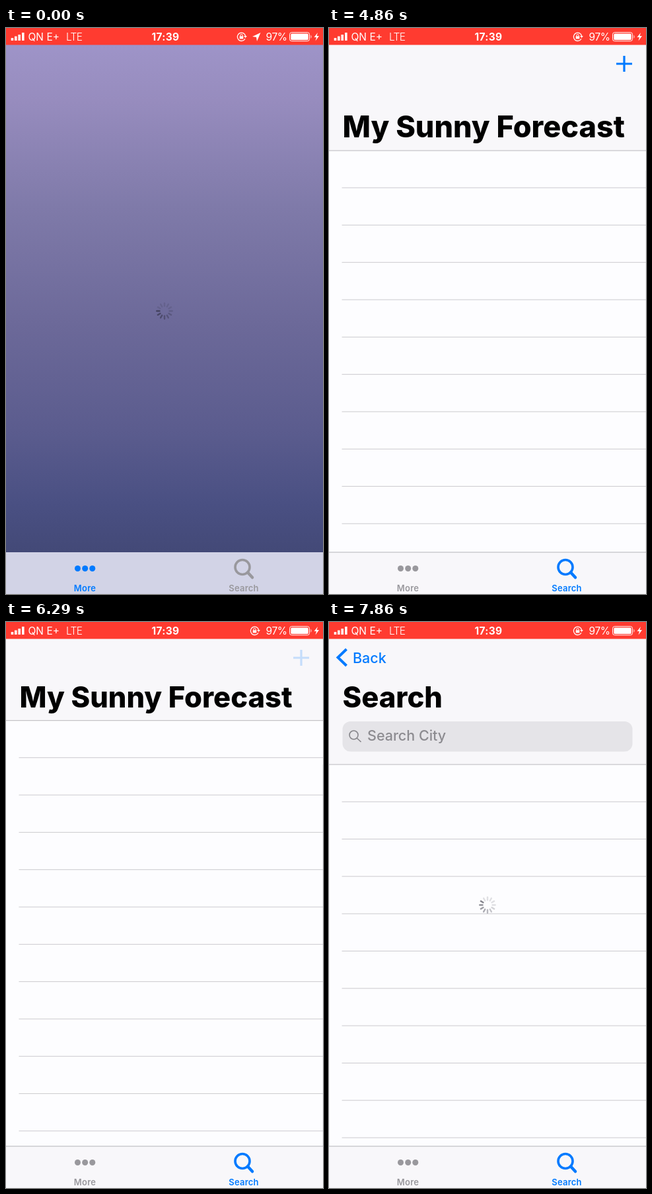
Write an HTML page that moves like this. It is 480 by 854 pixels and loops after 8 s.

```html
<!DOCTYPE html>
<html lang="en">
<head>
<meta charset="utf-8">
<title>Weather app</title>
<style>
  html, body { margin: 0; width: 100%; height: 100%; overflow: hidden; background: #fdfdff; }
  svg { display: block; width: 100%; height: 100%; }
  text { font-family: Inter, sans-serif; }
  .weather text { font-family: "Noto Sans CJK KR", "Noto Sans CJK", "Noto Sans CJK JP", sans-serif; font-weight: 500; fill: #fff; text-anchor: middle; }
  .title { font-size: 43.5px; font-weight: 800; }
  .field { font-size: 21.5px; font-weight: 500; }
  .label { font-size: 13px; font-weight: 600; text-anchor: middle; stroke: none; letter-spacing: .2px; }
  .status { font-size: 15.5px; fill: #fff; }
  .rows { stroke: #cbcace; stroke-width: 1; }
</style>
</head>
<body>
<svg viewBox="0 0 480 854" preserveAspectRatio="none">
  <defs>
    <linearGradient id="sky" x2="0" y2="1">
      <stop offset="0" stop-color="#9e94c8"/>
      <stop offset=".11" stop-color="#978cbe"/>
      <stop offset=".32" stop-color="#7f7aa9"/>
      <stop offset=".55" stop-color="#6c6999"/>
      <stop offset=".76" stop-color="#5b5c8e"/>
      <stop offset=".9" stop-color="#4a5083"/>
      <stop offset="1" stop-color="#434977"/>
    </linearGradient>
    <linearGradient id="puff" x2="0" y2="1">
      <stop offset=".3" stop-color="#fff"/>
      <stop offset=".8" stop-color="#e6e4e6"/>
      <stop offset="1" stop-color="#a9a6ac"/>
    </linearGradient>
  </defs>

  <g id="weather" class="weather">
    <rect y="25" width="480" height="767" fill="url(#sky)"/>
    <g id="report">
      <text x="238.5" y="152" font-size="86">Ansan</text>
      <text x="240" y="227" font-size="48">Current: 2.0°</text>
      <text x="240.5" y="286" font-size="38">Max: 3.0°</text>
      <text x="240.5" y="332" font-size="38">Min: 1.0°</text>
      <path d="M381 222.500Q408 225 437 222.500" fill="none" stroke="#55516e" stroke-width="2" opacity=".6"/>
      <path d="M382 222C373 221 375 209 384 208C383 198 389 194 394 196C399 189 411 191 413 199C420 194 428 200 427 207C435 205 442 211 442 216C442 220 439 222 435 222Z" fill="url(#puff)"/>
    </g>
  </g>

  <g id="list">
    <rect y="25" width="480" height="767" fill="#fdfdff"/>
    <g id="oldRows" class="rows"></g>
    <rect id="dim" y="25" width="480" height="767"/>
    <g id="newPage">
      <rect y="25" width="480" height="767" fill="#fdfdff"/>
      <path d="M0 215V791" stroke="#d9d8dc" stroke-width=".6"/>
      <g id="newRows" class="rows"></g>
    </g>
    <rect id="nav" y="25" width="480" fill="#f8f7fa"/>
    <path id="navLine" d="M0 0H480" stroke="#b8b7bc"/>
    <text id="listTitle" class="title">My Sunny Forecast</text>
    <path id="plus" d="M435 54H459M447 42V66" stroke="#007aff" stroke-width="3.200"/>
    <g id="searchNav">
      <text id="searchTitle" class="title" y="129">Search</text>
      <rect x="20.500" y="150" width="439" height="45.500" rx="12" fill="#e5e4e8"/>
      <g fill="none" stroke="#858489" stroke-width="1.600">
        <circle cx="37.500" cy="170.500" r="6.500"/>
        <path d="M42 175L48.500 181"/>
      </g>
      <text class="field" x="58" y="179" fill="#8c8b90">Search City</text>
      <path id="chevron" d="M26.500 41L13.500 53.500L26.500 66" fill="none" stroke="#007aff" stroke-width="4"/>
      <text id="back" class="field" fill="#007aff">Back</text>
    </g>
  </g>

  <g id="spinner"></g>

  <rect id="tabs" y="791" width="480" height="63"/>
  <path id="tabLine" d="M0 791H480" stroke="#b4b3b8"/>
  <g id="moreTab">
    <circle cx="108.500" cy="815.500" r="4.500"/><circle cx="119.700" cy="815.500" r="4.500"/><circle cx="130.800" cy="815.500" r="4.500"/>
    <text class="label" x="119.500" y="849.500">More</text>
  </g>
  <g id="searchTab">
    <circle cx="358" cy="813.500" r="11" fill="none" stroke="currentColor" stroke-width="3.600"/>
    <path d="M366 821.500L373 829" stroke="currentColor" stroke-width="4.500" stroke-linecap="round"/>
    <text class="label" x="360" y="849.500">Search</text>
  </g>

  <rect width="480" height="25.500" fill="#ff3b30"/>
  <g class="status">
    <path d="M9.500 19V15M14.800 19V12.500M20.200 19V10M25.800 19V7" stroke="#fff" stroke-width="3.600"/>
    <text x="33.500" y="18.500">QN E+</text>
    <text x="91" y="18.500" font-weight="300" letter-spacing="-.7">LTE</text>
    <text x="241.500" y="18.500" font-weight="700" text-anchor="middle" letter-spacing=".3">17:39</text>
    <text x="393.500" y="18.500" letter-spacing="-.4">97%</text>
    <rect x="429.500" y="6.700" width="30" height="13" rx="3" fill="none" stroke="#fff"/>
    <rect x="431.300" y="8.500" width="26.400" height="9.400" rx="1.500"/>
    <path d="M461.500 10.500Q463.500 13.200 461.500 16Z"/>
    <path d="M472 7L466.500 14H470L468.500 19.500L474 12H470.500Z"/>
    <g id="lock">
      <path d="M5.500 3.200A6.200 6.200 0 1 1 6.100 -1" fill="none" stroke="#fff" stroke-width="1.300"/>
      <path d="M3.600 -1H8.400L6 2Z"/>
      <rect x="-2.800" y="-.6" width="5.600" height="4"/>
      <path d="M-1.600 0V-2A1.600 1.600 0 0 1 1.600 -2V0" fill="none" stroke="#fff"/>
    </g>
    <path id="locator" d="M385.500 7L373 13L379 13.800L380 20Z"/>
  </g>
</svg>

<script>
const LOOP = 8000, WIDTH = 480, ROW = 56.32;
const TICK_STARTS = [0, 150, 290, 430, 570, 720, 860];   // seven pictures a second
const REPORT = 2, LOCATED = 9, LIST = 28, PULL = 33, RELEASED = 38, TAP = 44, PUSH = 47;
const BLUE = "#007aff", GREY = "#99989d";
const el = Object.fromEntries([...document.querySelectorAll("[id]")].map(node => [node.id, node]));

function set(node, attributes) {
  for (const name in attributes) node.setAttribute(name, attributes[name]);
}
const show = (node, visible) => node.style.display = visible ? "" : "none";

function addRows(group, top) {
  let d = "";
  for (let y = top + ROW; y < 791; y += ROW) d += `M19.500 ${y.toFixed(2)}H800`;
  group.innerHTML = `<path d="${d}"/>`;
}
addRows(el.oldRows, 148.4);
addRows(el.newRows, 214.9);

el.spinner.innerHTML = Array.from({ length: 12 }, (_, i) =>
  `<path d="M0 -7.500V-11.700" transform="rotate(${i * 30})" stroke="#222230" stroke-width="2.400" stroke-linecap="round"/>`
).join("");

function drawSpinner(tick, x) {
  const head = Math.round(tick * 12 / 7) + (tick < LIST ? 9 : 0);
  set(el.spinner, { transform: `translate(${x} 427)` });
  [...el.spinner.children].forEach((spoke, i) => {
    const age = ((head - i) % 12 + 12) % 12;
    set(spoke, { opacity: Math.max(.13, .55 - age * .06) });
  });
}

function pullDistance(tick) {
  if (tick < PULL || tick >= RELEASED) return 0;
  return tick === PULL ? 10 : 7.5 * 2.2 ** (36 - tick);
}

function drawList(tick) {
  const pushing = tick >= PUSH;
  const pull = pullDistance(tick);
  const x = pushing ? 32.5 * .18 ** (tick - 48) : WIDTH;
  const left = x / WIDTH;
  const navBottom = pushing ? 215 : 148.7 + pull;

  set(el.oldRows, { transform: `translate(${-.3 * (WIDTH - x)} ${pull})` });
  set(el.dim, { opacity: .1 * (1 - left) });
  set(el.newPage, { transform: `translate(${x} 0)` });
  set(el.nav, { height: navBottom - 25 });
  set(el.navLine, { transform: `translate(0 ${navBottom})` });

  const scale = 1 + pull / 1050;
  set(el.listTitle, {
    transform: `translate(${20.5 - .3 * (WIDTH - x)} ${129 + pull}) scale(${scale})`,
    opacity: left < .1 ? 0 : left
  });
  set(el.plus, { opacity: pushing ? Math.min(.2, left * 1.2) : tick >= TAP ? .2 : 1 });

  show(el.searchNav, pushing);
  set(el.searchTitle, { x: 20.5 + x });
  set(el.back, { x: 36 + x * .15, y: 61.500 + x * .12, opacity: Math.max(0, 1 - left * 2.2) });
  const size = 1 - Math.min(.3, left * 2.7);
  set(el.chevron, {
    transform: `translate(${x * .2 + 20 * (1 - size)} ${x * .12 + 53.5 * (1 - size)}) scale(${size})`,
    opacity: Math.max(.1, 1 - left * 8.5)
  });
  return x;
}

function draw(time) {
  const second = Math.floor(time / 1000);
  const tick = second * 7 + TICK_STARTS.filter(start => start <= time % 1000).length - 1;
  const onList = tick >= LIST;

  show(el.weather, !onList);
  show(el.report, tick >= REPORT);
  show(el.list, onList);
  show(el.locator, tick < LOCATED);
  set(el.lock, { transform: `translate(${tick < LOCATED ? 356.500 : 376.500} 13)` });

  const pageX = onList ? drawList(tick) : 0;
  show(el.spinner, tick < REPORT || tick >= PUSH);
  drawSpinner(tick, 240 + pageX);

  set(el.tabs, { fill: onList ? "#f8f7fa" : "#d2d3e6" });
  show(el.tabLine, onList);
  set(el.moreTab, { fill: onList ? GREY : BLUE });
  set(el.searchTab, { fill: onList ? BLUE : GREY, color: onList ? BLUE : GREY });
}

function frame() {
  draw(performance.now() % LOOP);
  requestAnimationFrame(frame);
}
frame();
</script>
</body>
</html>
```
